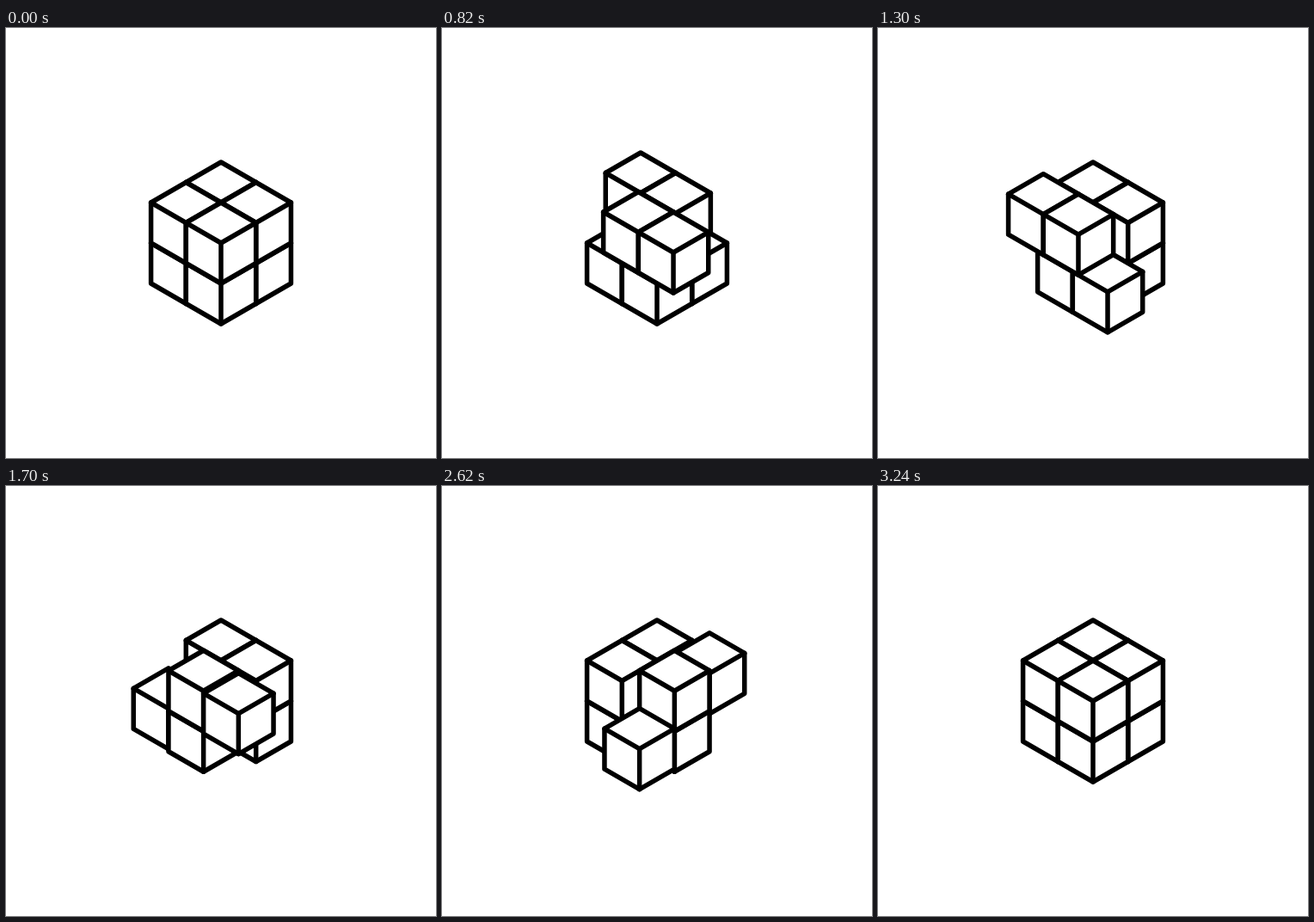
These frames come from a looping animation (500 by 500 pixels, 3.26 s). An HTML page with a canvas:

```html
<!DOCTYPE html>
<html lang="en">
<head>
<meta charset="utf-8">
<title>Sliding cubes</title>
<style>
  html, body { margin: 0; width: 100%; height: 100%; overflow: hidden; background: #fff; }
  canvas { display: block; width: 500px; height: 500px; }
</style>
</head>
<body>
<canvas id="stage" width="500" height="500"></canvas>
<script>
const ctx = document.getElementById('stage').getContext('2d');
const LOOP = 3260, TURN = 1080, STEP = 360;
const EDGE = 47, DX = 40.7, DY = EDGE / 2;

// Each turn shifts one outer layer: u and v span it, w is its fixed axis.
const TURNS = [
  { u: 'x', v: 'y', w: 'z' },
  { u: 'x', v: 'z', w: 'y' },
  { u: 'y', v: 'z', w: 'x' }
];

// cubic-bezier(.8, 0, .2, 1)
function ease(p) {
  if (p <= 0 || p >= 1) return p <= 0 ? 0 : 1;
  let lo = 0, hi = 1, s;
  for (let i = 0; i < 24; i++) {
    s = (lo + hi) / 2;
    const x = 2.4 * (1 - s) ** 2 * s + 0.6 * (1 - s) * s * s + s ** 3;
    if (x < p) lo = s; else hi = s;
  }
  return s * s * (3 - 2 * s);
}

// Positions in the moving layer, listed from back to front.
function layerCells(time) {
  const stage = Math.min(2, Math.floor(time / STEP));
  const e = ease(time / STEP - stage);
  if (stage === 1) {
    return [[-0.5, 1 - e], [0.5, 0], [0.5, 1], [1.5, e]];
  }
  const d = stage === 0 ? e / 2 : (e - 1) / 2;
  return [[d, 0], [1 + d, 0], [-d, 1], [1 - d, 1]];
}

function path(points, closed) {
  ctx.beginPath();
  for (const [x, y] of points) ctx.lineTo(x, y);
  if (closed) {
    ctx.closePath();
    ctx.fill();
  }
  ctx.stroke();
}

function drawCube({ x, y, z }) {
  const cx = 250 + DX * (x - y);
  const top = 156 + DY * (x + y) + EDGE * (1 - z);
  const l = cx - DX, r = cx + DX;
  const side = top + DY, front = top + EDGE;
  path([[cx, top], [r, side], [r, side + EDGE], [cx, front + EDGE],
        [l, side + EDGE], [l, side]], true);
  path([[l, side], [cx, front], [r, side]]);
  path([[cx, front], [cx, front + EDGE]]);
}

function draw(t) {
  const active = t < TURN * 3;
  const index = active ? Math.floor(t / TURN) : 0;
  const { u, v, w } = TURNS[index];
  const place = (a, b, c) => drawCube({ [u]: a, [v]: b, [w]: c });

  ctx.fillStyle = '#fff';
  ctx.fillRect(0, 0, 500, 500);
  ctx.strokeStyle = '#000';
  ctx.lineWidth = 5.5;
  ctx.lineJoin = ctx.lineCap = 'round';

  for (const [a, b] of layerCells(0)) place(a, b, 0);
  for (const [a, b] of layerCells(active ? t - index * TURN : 0)) place(a, b, 1);
}

const start = performance.now();
function tick() {
  draw((performance.now() - start) % LOOP);
  requestAnimationFrame(tick);
}
tick();
</script>
</body>
</html>
```
